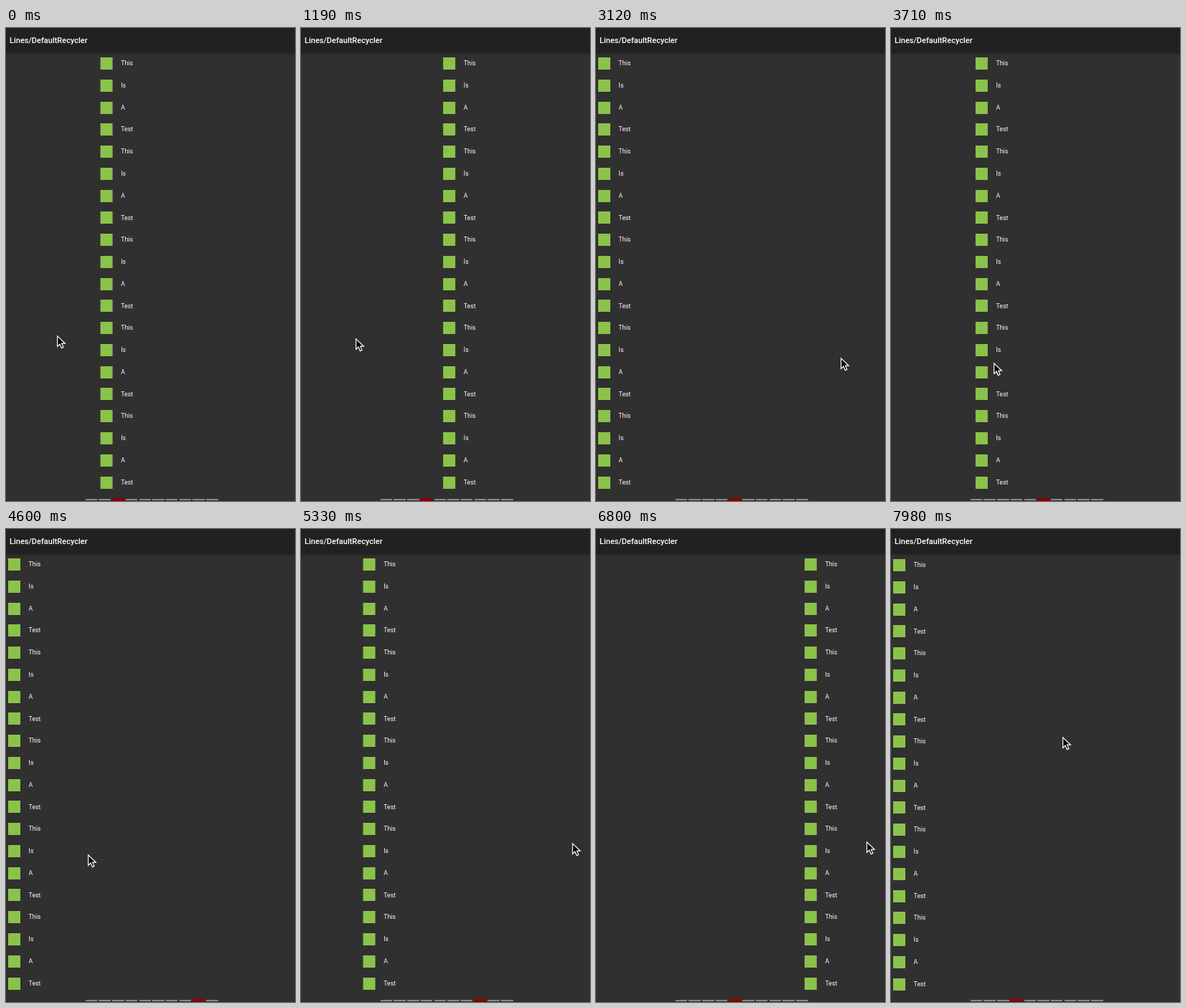
Animation, 403 px wide and 660 px high, one loop 8000 ms. Source, as an HTML page:

```html
<!DOCTYPE html>
<html lang="en">
<head>
<meta charset="utf-8">
<title>Lines/DefaultRecycler</title>
<style>
  html, body { margin: 0; width: 100%; height: 100%; overflow: hidden; background: #303030; }
  body { position: relative; font-family: Roboto, sans-serif; color: #fff; }
  header {
    position: absolute; inset: 0 0 auto; height: 35px; background: #212121;
    font: 500 11px/36px Roboto, sans-serif; text-indent: 5px;
  }
  header::after {
    content: ""; position: absolute; left: 0; right: 0; top: 35px; height: 4px;
    background: linear-gradient(#282828, #30303000);
  }
  #pager { position: absolute; left: 0; top: 35px; width: 403px; height: 620px; overflow: hidden; }
  .page { position: absolute; left: 0; top: 0; width: 403px; }
  .row {
    position: absolute; left: -6px; width: 409px; height: 30.76px;
    font-size: 8.8px; line-height: 30.76px; text-indent: 37.6px;
  }
  .row::before {
    content: ""; position: absolute; left: 9.2px; top: 6.9px;
    width: 17px; height: 17px; background: #8bc34a;
  }
  .pressed { background: #3d3d3d; }
  .dash { position: absolute; top: 656.5px; width: 16.6px; height: 2.6px; background: #888; }
  .dash.on { margin-left: -1px; top: 656px; width: 18.6px; height: 4px; background: #8b0000; }
  #cursor { position: absolute; left: 0; top: 0; overflow: visible; }
</style>
</head>
<body>
<div id="pager"><div class="page"></div><div class="page"></div></div>
<header>Lines/DefaultRecycler</header>
<svg id="cursor" width="12" height="19">
  <path d="M.7 .9V15.3L4.1 12 6.5 17.6 9 16.5 6.7 11.2H11.4Z" fill="#000" stroke="#fff" stroke-width="1.2"/>
</svg>
<script>
const LOOP = 8000, WIDTH = 403, ROW = 30.76, LAST = 54, LIST_GRIP = 412;
const WORDS = ['This', 'Is', 'A', 'Test'];
const PRESS = { step: 16, row: 13 };

// Each fling eases out from wherever the pager was to page `to`.
const FLINGS = [
  { start: -1, end: 3, to: 2, power: 3.97 },
  { start: 7, end: 11, to: 3, power: 2.52 },
  { start: 13, end: 16, to: 6.474, power: 1 },
  { start: 16, end: 21, to: 4, power: 1.5 },
  { start: 24, end: 30, to: 8, power: 1.08 },
  { start: 34, end: 40, to: 5, power: 1.27 },
  { start: 45, end: 50, to: 3, power: 1.98 }
];

// Where the pointer turns: [step, x, y]
const TURNS = [
  [0, 71, 429], [7, 280, 441], [8, 76, 433], [11, 232, 442], [12, 232, 442],
  [14, 110, 440], [16, 267, 449], [17, 383, 452], [24, 310, 466], [25, 143, 467],
  [34, 100, 447], [36, 378, 438], [45, 89, 439], [46, 377, 436], [51, 240, 430], [54, 239, 290]
];

const add = (parent, cls, text = '') => {
  const el = document.createElement('div');
  el.className = cls;
  el.textContent = text;
  return parent.appendChild(el);
};

const pages = [...document.querySelectorAll('.page')];
const cursor = document.getElementById('cursor');
const rows = pages.map(page => Array.from({ length: 25 }, (_, i) => {
  const row = add(page, 'row', WORDS[i % WORDS.length]);
  row.style.top = -0.8 + i * ROW + 'px';
  return row;
}));
const dashes = Array.from({ length: 10 }, (_, i) => {
  const dash = add(document.body, 'dash');
  dash.style.left = 110.8 + i * 18.68 + 'px';
  return dash;
});

const clamp = v => Math.min(1, Math.max(0, v));

function pagePosition(step) {
  return FLINGS.reduce((from, { start, end, to, power }) => {
    const left = 1 - clamp((step - start) / (end - start));
    return to + (from - to) * left ** power;
  }, 1);
}

function pointerAt(step) {
  const i = Math.max(1, TURNS.findIndex(turn => turn[0] >= step));
  const [s0, x0, y0] = TURNS[i - 1], [s1, x1, y1] = TURNS[i];
  const u = (step - s0) / (s1 - s0);
  return [x0 + (x1 - x0) * u, y0 + (y1 - y0) * u];
}

// The picture advances in steps of about 148 ms.
const startOf = step => 148.8 * step - 0.019 * step * step - 6;

function stepAt(time) {
  let step = 0;
  while (step < LAST && startOf(step + 1) <= time) step++;
  return step;
}

const move = (el, x, y) => { el.style.transform = `translate(${x}px, ${y}px)`; };

let shown = -1;
function draw(step) {
  if (step === shown) return;
  shown = step;
  const pos = pagePosition(step), first = Math.floor(pos);
  const [x, y] = pointerAt(step);
  const lift = Math.max(0, LIST_GRIP - y);
  pages.forEach((page, i) => move(page, (first + i - pos) * WIDTH, -lift));
  dashes.forEach((dash, i) => dash.classList.toggle('on', i === Math.round(pos)));
  rows[1][PRESS.row].classList.toggle('pressed', step === PRESS.step);
  move(cursor, Math.round(x), Math.round(y));
}

const begin = performance.now();
function tick() {
  draw(stepAt((performance.now() - begin) % LOOP));
  requestAnimationFrame(tick);
}
tick();
</script>
</body>
</html>
```
